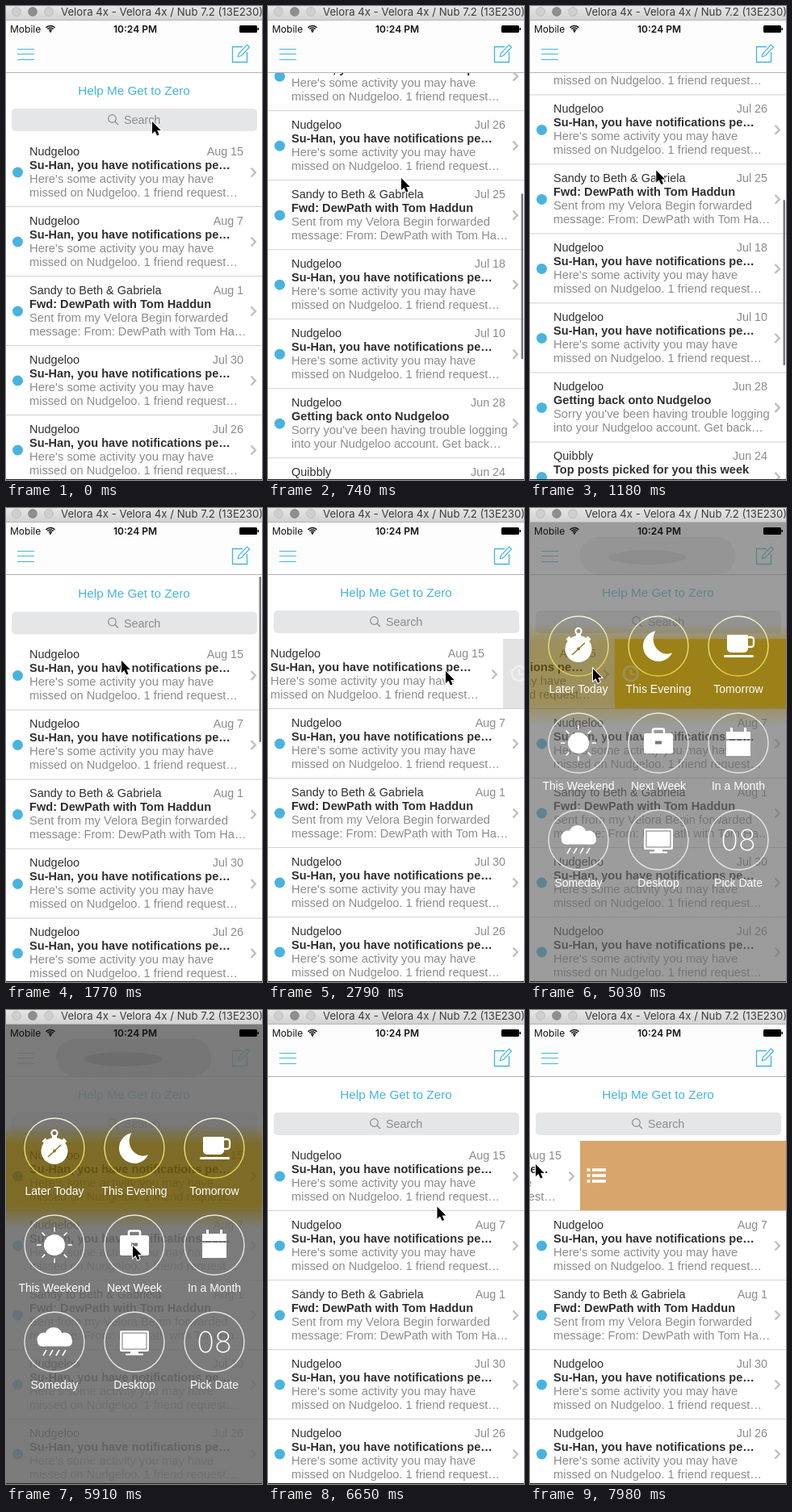
These frames come from a looping animation (317 by 587 pixels, 8 s). An HTML page with a canvas:

```html
<!DOCTYPE html>
<html lang="en">
<head>
<meta charset="utf-8">
<title>Inbox swipe demo</title>
<style>
html, body { margin: 0; width: 100%; height: 100%; overflow: hidden; background: #fff; }
canvas { display: block; width: 317px; height: 587px; }
</style>
</head>
<body>
<canvas id="stage"></canvas>
<script>
const W = 317, H = 587, LOOP = 8000, STEP = 147.7, LAST = 54;
const NAV = 83, ROW = 86, FIRST = 162;
const CYAN = '#45b5dc', GREY = '#8c8c8c', INK = '#303030', WHITE = '#fff', SHADE = '#777';
const SANS = '"Liberation Sans", Arial, sans-serif';
const UI = 'Inter, Roboto, sans-serif';

const canvas = document.getElementById('stage');
const ctx = canvas.getContext('2d');
const dpr = window.devicePixelRatio || 1;
canvas.width = W * dpr;
canvas.height = H * dpr;

const mails = {
  notice: ['Nudgeloo', 'Su-Han, you have notifications pe…',
    "Here's some activity you may have", 'missed on Nudgeloo. 1 friend request…'],
  forward: ['Sandy to Beth & Gabriela', 'Fwd: DewPath with Tom Haddun',
    'Sent from my Velora Begin forwarded', 'message: From: DewPath with Tom Ha…'],
  login: ['Nudgeloo', 'Getting back onto Nudgeloo',
    "Sorry you've been having trouble logging", 'into your Nudgeloo account. Get back…'],
  posts: ['Quibbly', 'Top posts picked for you this week',
    'See what people are sharing in your', 'circles. New posts from friends and…']
};
const kinds = { 2: 'forward', 5: 'forward', 8: 'login', 9: 'posts' };
const dates = ['Aug 15', 'Aug 7', 'Aug 1', 'Jul 30', 'Jul 26', 'Jul 25',
  'Jul 18', 'Jul 10', 'Jun 28', 'Jun 24', 'Jun 20', 'Jun 17'];

// All motion is a function of the step k
const ramp = (k, from, to) => Math.min(1, Math.max(0, (k - from) / (to - from)));
const glide = (k, from, to) => {
  const p = ramp(k, from, to);
  return p * p * (3 - 2 * p);
};

function scrollAt(k) {
  const bounce = k < 11 ? 0 : 12 * 8 ** (11 - k);
  return 470 * (glide(k, 0, 7) - glide(k, 7, 11)) - bounce;
}

function shiftAt(k) {
  const nudge = 52 * (glide(k, 16, 20) - glide(k, 20, 24));
  const snooze = k < 37 ? 149 * glide(k, 26, 32) + 168 * glide(k, 32, 36.8) : 0;
  return -(nudge + snooze + 255 * glide(k, 47, LAST));
}

const barAt = k => ramp(k, 0, 1) - ramp(k, 13, 16);
const dimAt = k => ramp(k, 32, 35) - ramp(k, 39.6, 43);

// Pointer moves: [from, to, x, y]
const moves = [
  [0, 2, 176, 400], [2, 5, 165, 213], [5, 12, 143, 189], [12, 16, 246, 202],
  [16, 20, 194, 202], [20, 24, 246, 202], [24, 26, 227, 202], [26, 32, 78, 199],
  [34, 38, 157, 292], [43, 47, 262, 195], [47, LAST, 7, 191]
];
const pointerAt = k => moves.reduce(([x, y], [from, to, nx, ny]) => {
  const p = glide(k, from, to);
  return [x + (nx - x) * p, y + (ny - y) * p];
}, [181, 143]);

function rect(x, y, w, h, color) {
  ctx.fillStyle = color;
  ctx.fillRect(x, y, w, h);
}

function fill(color) {
  ctx.fillStyle = color;
  ctx.fill();
}

function stroke(color, width) {
  ctx.strokeStyle = color;
  ctx.lineWidth = width;
  ctx.stroke();
}

function box(x, y, w, h, r) {
  ctx.beginPath();
  ctx.roundRect(x, y, w, h, r);
}

function circle(x, y, r) {
  ctx.beginPath();
  ctx.arc(x, y, r, 0, Math.PI * 2);
}

function round(x, y, w, h, r, color) {
  box(x, y, w, h, r);
  fill(color);
}

function disc(x, y, r, color) {
  circle(x, y, r);
  fill(color);
}

function ring(x, y, r, color, width) {
  circle(x, y, r);
  stroke(color, width);
}

function path(points) {
  ctx.beginPath();
  for (let i = 0; i < points.length; i += 2) ctx.lineTo(points[i], points[i + 1]);
}

function line(points, color, width) {
  path(points);
  stroke(color, width);
}

function text(str, x, y, font, color, align = 'left') {
  ctx.font = font;
  ctx.fillStyle = color;
  ctx.textAlign = align;
  ctx.fillText(str, x, y);
}

function fade(top, bottom, stops) {
  const g = ctx.createLinearGradient(0, top, 0, bottom);
  for (const [y, color] of stops) g.addColorStop((y - top) / (bottom - top), color);
  return g;
}

function drawTitleBar() {
  rect(0, 0, W, 17, fade(0, 17, [[0, '#e6e6e6'], [17, '#d2d2d2']]));
  rect(0, 17, W, 1, '#b4b4b4');
  for (const x of [13, 33, 53]) {
    disc(x, 7, 5.7, x === 33 ? '#8e8e8e' : '#cfcfcf');
    ring(x, 7, 5.5, 'rgba(0,0,0,.1)', 1);
  }
  text('Velora 4x - Velora 4x / Nub 7.2 (13E230)', 68, 12, '13.2px ' + UI, '#3c3c3c');
}

function drawStatus() {
  text('Mobile', 5, 32.5, '12px ' + UI, '#111');
  for (const r of [2.5, 5, 7.5]) {
    ctx.beginPath();
    ctx.arc(55, 32, r, -Math.PI * .76, -Math.PI * .24);
    stroke('#111', 1.6);
  }
  disc(55, 31.6, 1.2, '#111');
  text('10:24 PM', 160, 32.5, '600 12px ' + UI, '#111', 'center');
  round(289, 24, 22, 9, 1.5, '#000');
  rect(311.5, 27, 1.5, 3, '#000');
}

function drawNav() {
  rect(0, 18, W, 64, '#fdfdfd');
  rect(0, 82, W, 1, '#b2b2b2');
  for (const y of [53, 59, 66]) rect(14, y, 21, 1, CYAN);
  line([293, 50.5, 280.5, 50.5, 280.5, 69.5, 298.5, 69.5, 298.5, 57], CYAN, 1.3);
  line([287, 63, 288.5, 58.5, 298.5, 48, 301.5, 51, 291.5, 61.5, 287, 63], CYAN, 1.2);
}

function drawHeader() {
  text('Help Me Get to Zero', 158.5, 109.5, '15.3px ' + SANS, CYAN, 'center');
  round(7, 127, 304, 28, 5, '#e5e6e8');
  ring(131.5, 139.5, 4.8, GREY, 1.2);
  line([135, 143, 139, 147], GREY, 1.3);
  text('Search', 146, 146, '14.3px ' + SANS, GREY);
}

function drawMail(y, i) {
  const [from, subject, first, second] = mails[kinds[i] || 'notice'];
  rect(0, y, W, ROW, WHITE);
  disc(14.5, y + 44, 6.5, '#48b4de');
  text(from, 29, y + 22.5, '14.5px ' + SANS, INK);
  text(dates[i], 294, y + 22.5, '14.3px ' + SANS, GREY, 'right');
  text(subject, 29, y + 39.5, 'bold 14.6px ' + SANS, INK);
  text(first, 29, y + 56.7, '14.8px ' + SANS, GREY);
  text(second, 29, y + 73.5, '14.65px ' + SANS, GREY);
  line([303.5, y + 38.5, 308.8, y + 44, 303.5, y + 49.5], '#bfbfbf', 2.4);
}

function drawSwipe(y, shift) {
  const x = W + shift + 20, cy = y + 43;
  const far = shift < -240, ready = shift < -60;
  rect(0, y, W, ROW, far ? '#d8a66d' : ready ? '#fad333' : '#e3e3e3');
  ctx.save();
  if (!ready) ctx.globalAlpha = -shift / 60;
  if (far) {
    for (const dy of [-7, 0, 7]) {
      rect(x - 11.5, cy + dy - 1.8, 4, 3.6, WHITE);
      rect(x - 5, cy + dy - 1.8, 17, 3.6, WHITE);
    }
  } else {
    ring(x, cy, 9, WHITE, 2.8);
    line([x, cy - 5, x, cy + 1, x + 5, cy + 1], WHITE, 2.2);
  }
  ctx.restore();
}

function drawFeed(scroll, shift, bar) {
  ctx.save();
  ctx.beginPath();
  ctx.rect(0, NAV, W, 586 - NAV);
  ctx.clip();
  ctx.translate(0, -scroll);
  drawHeader();
  dates.forEach((_, i) => {
    const y = FIRST + i * ROW;
    ctx.save();
    if (i === 0 && shift) {
      drawSwipe(y, shift);
      ctx.translate(shift, 0);
    }
    drawMail(y, i);
    ctx.restore();
    if (i) rect(0, y, W, 1, '#d2d2d2');
  });
  ctx.translate(0, scroll);
  round(313.5, 85 + Math.max(0, scroll) * .391, 2.5, 205, 1.2, `rgba(120,120,120,${bar})`);
  ctx.restore();
}

// Menu icons, drawn around their own centre
const icons = {
  'Later Today'() {
    disc(0, 3.5, 16.5, WHITE);
    ring(0, -18.5, 3.6, WHITE, 2.2);
    rect(-3, -15, 6, 5, WHITE);
    for (const side of [-1, 1]) line([side * 10, -11, side * 14, -7], WHITE, 4);
    line([-8, 11, 8, -4], '#8f7a28', 1.5);
    disc(0, 3.5, 2, '#8f7a28');
  },
  'This Evening'() {
    ctx.beginPath();
    ctx.arc(0, 0, 19, -1.75, .45, true);
    ctx.bezierCurveTo(3, 15, -13, -3, -3.4, -18.7);
    fill(WHITE);
  },
  'Tomorrow'() {
    round(-14, -14, 26, 22, [1, 1, 5, 5], WHITE);
    box(10, -11, 9, 12, 3);
    stroke(WHITE, 2.3);
    round(-18, 11, 37, 3, 1.5, WHITE);
  },
  'This Weekend'() {
    disc(0, 0, 13, WHITE);
    for (let a = 0; a < 8; a++) {
      const c = Math.cos(a * Math.PI / 4), s = Math.sin(a * Math.PI / 4);
      line([c * 16.5, s * 16.5, c * 22, s * 22], WHITE, 1.6);
    }
  },
  'Next Week'() {
    box(-7, -17.5, 14, 9, 2);
    stroke(WHITE, 2.5);
    round(-18, -12, 36, 25, 2, WHITE);
    rect(-4, -2.5, 8, 4, SHADE);
  },
  'In a Month'() {
    rect(-15, -14, 30, 9, WHITE);
    for (const x of [-10, 7]) rect(x, -19, 3, 6, WHITE);
    rect(-15, -3, 30, 19, WHITE);
  },
  'Someday'() {
    disc(-13, -3, 8.5, WHITE);
    disc(-1, -7, 11, WHITE);
    disc(13, -3, 8.5, WHITE);
    round(-21, -6, 43, 11.5, 5.5, WHITE);
    for (let x = -12; x < 15; x += 8) line([x + 2, 10, x - 2, 17], WHITE, 1.6);
  },
  'Desktop'() {
    round(-18, -14, 36, 26, 2, WHITE);
    ctx.strokeStyle = SHADE;
    ctx.lineWidth = 1;
    ctx.strokeRect(-15, -11, 30, 20);
    rect(-5, 12, 10, 3, WHITE);
    rect(-11, 14.5, 22, 2, WHITE);
  },
  'Pick Date'() {
    text('08', 0, 13, '200 36px ' + UI, WHITE, 'center');
  }
};

function drawMenu(dim) {
  const grey = '#6a6a6a', gold = '#6c580a';
  ctx.save();
  ctx.globalAlpha = dim;
  rect(0, 18, W, 568, fade(18, 586, [[142, grey], [166, gold], [242, gold], [270, grey]]));
  round(62, 36, 192, 46, 23, 'rgba(0,0,0,.06)');
  ctx.beginPath();
  ctx.ellipse(145, 61, 48, 9, 0, 0, Math.PI * 2);
  fill('rgba(0,0,0,.08)');

  ctx.globalAlpha = Math.min(1, dim * 1.5);
  const rim = fade(-37, 37, [[-37, '#f2eed6'], [37, '#decb3c']]);
  Object.entries(icons).forEach(([label, draw], i) => {
    ctx.save();
    ctx.translate(60 + i % 3 * 99, 171 + Math.floor(i / 3) * 120);
    ring(0, 0, 37, i < 3 ? rim : '#e6e6e6', 1.4);
    draw();
    text(label, 0, 58, '14px ' + SANS, WHITE, 'center');
    ctx.restore();
  });
  ctx.restore();
}

function drawPointer(x, y) {
  ctx.save();
  ctx.translate(x, y);
  path([0, 0, 0, 15, 3.5, 12, 6, 17.5, 8.6, 16.4, 6.2, 11, 10.8, 11]);
  ctx.closePath();
  stroke(WHITE, 2);
  fill('#000');
  ctx.restore();
}

function draw(time) {
  const k = Math.min(LAST, Math.floor((time % LOOP + 8) / STEP));
  const dim = dimAt(k);
  ctx.setTransform(dpr, 0, 0, dpr, 0, 0);
  rect(0, 0, W, H, WHITE);
  drawFeed(scrollAt(k), shiftAt(k), barAt(k));
  drawNav();
  if (dim > 0) drawMenu(dim);
  drawStatus();
  drawTitleBar();
  rect(0, 586, W, 1, '#222');
  drawPointer(...pointerAt(k));
}

const start = performance.now();
function tick() {
  draw(performance.now() - start);
  requestAnimationFrame(tick);
}
tick();
</script>
</body>
</html>
```
